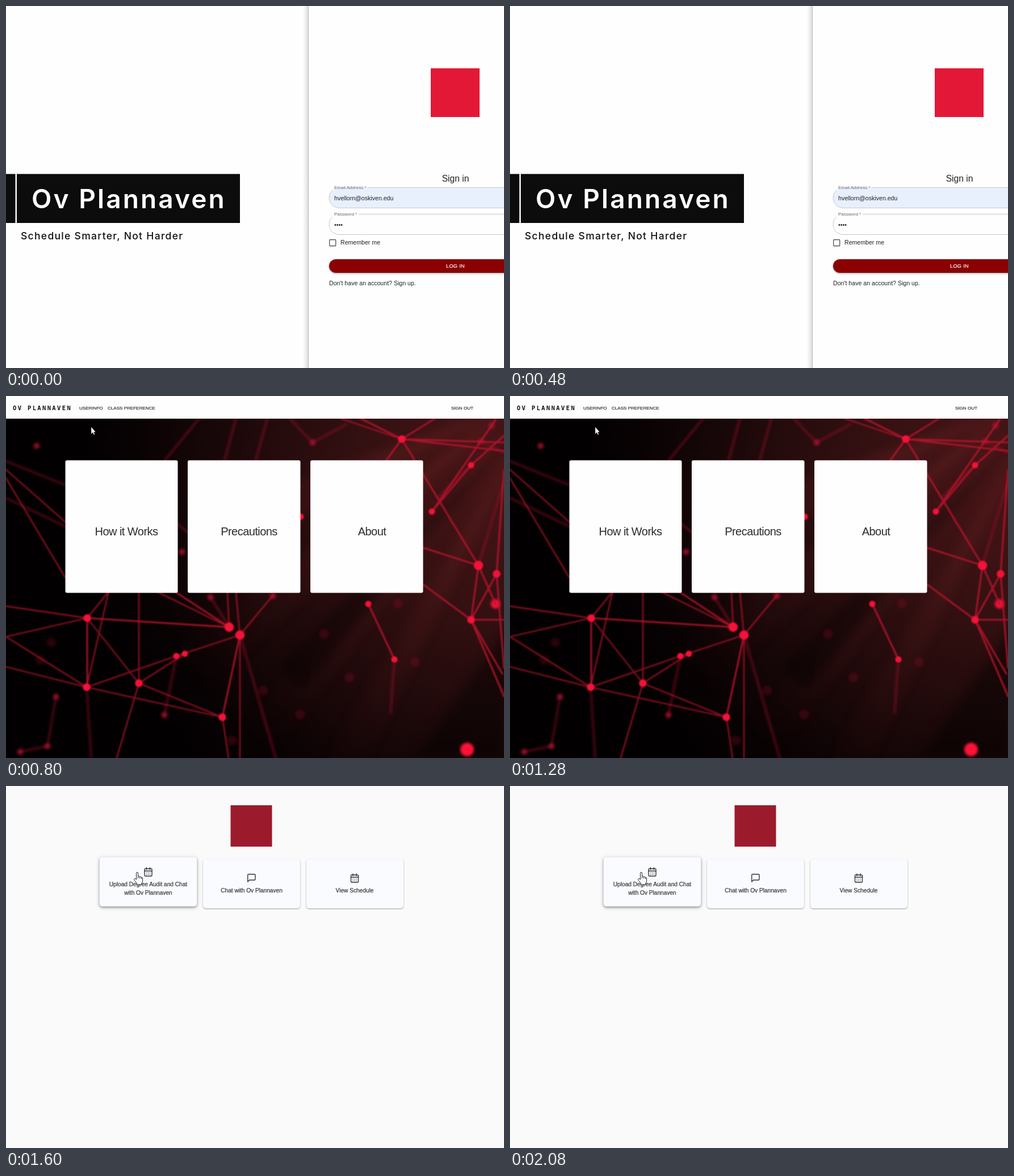
Recreate the animation shown at these times as an HTML page. Size 877 by 639 pixels, loop 2.4 s.

```html
<!DOCTYPE html>
<html lang="en">
<head>
<meta charset="utf-8">
<title>Class planner</title>
<style>
  html, body { margin: 0; width: 100%; height: 100%; overflow: hidden; background: #fefefe; }
  svg { position: absolute; left: 0; top: 0; width: 877px; height: 639px; }
  text { font-family: "Liberation Sans", Arial, sans-serif; fill: #222; }
  .mid { text-anchor: middle; }

  /* Three screens, cut hard every 800 ms */
  .scene { visibility: hidden; animation: show 2400ms step-end infinite; }
  .login { visibility: visible; animation: none; }
  .home { animation-delay: -1600ms; }
  .menu { animation-delay: -800ms; }
  @keyframes show {
    0% { visibility: visible; }
    33.3334%, 100% { visibility: hidden; }
  }

  .brand { font: 600 46px Inter, sans-serif; letter-spacing: 3.1px; fill: #fff; }
  .tag { font: 500 17.5px Inter, sans-serif; letter-spacing: 1.3px; fill: #111; }
  .form text { font-size: 10.6px; }
  .form .label { font-size: 8px; fill: #666; }
  .form .action { font-size: 9.2px; letter-spacing: .3px; fill: #fff; stroke: #fff; stroke-width: .2px; }
  .outline { fill: none; stroke: #c8c8c8; }
  .raised { filter: drop-shadow(0 1.5px 1.5px rgba(0, 0, 0, .4)); }

  .web { fill: none; stroke-linecap: round; }
  .soft { filter: blur(2.2px); }
  .crisp { filter: blur(1px); }
  .nav text { font-size: 8.05px; stroke: #222; stroke-width: .15px; }
  .nav .name { font: bold 10.5px "DejaVu Sans Mono", monospace; letter-spacing: 2.35px; stroke: none; fill: #111; }
  .tiles text { font-size: 20px; letter-spacing: -.55px; fill: #2b2b2b; }

  .menu text { font-size: 10.13px; fill: #333; stroke: #333; stroke-width: .2px; }
  .card { fill: #f9fbff; filter: drop-shadow(0 1px 1.2px rgba(0, 0, 0, .38)); }
  .lift { filter: drop-shadow(0 2px 2px rgba(0, 0, 0, .38)) drop-shadow(0 1px 4px rgba(0, 0, 0, .1)); }
  .icon { fill: none; stroke: #333; stroke-width: 1.4px; stroke-linejoin: round; stroke-linecap: round; }
</style>
</head>
<body>

<svg class="scene login" viewBox="0 0 877 639">
  <defs>
    <linearGradient id="edge">
      <stop offset="0" stop-color="#fefefe"/>
      <stop offset=".25" stop-color="#f5f5f5"/>
      <stop offset=".75" stop-color="#e6e6e6"/>
      <stop offset="1" stop-color="#bcbcbc"/>
    </linearGradient>
  </defs>
  <rect width="877" height="639" fill="#fefefe"/>
  <rect x="523" width="10" height="639" fill="url(#edge)"/>

  <path d="M0 296.5H16.5V383H0ZM19 296.5H412V383H19Z" fill="#0c0c0c"/>
  <text class="brand" x="45" y="357">Ov Plannaven</text>
  <text class="tag" x="26" y="412">Schedule Smarter, Not Harder</text>

  <rect x="748" y="110" width="86" height="86" fill="#e31837"/>
  <text class="mid" x="791.5" y="310" font-size="15.6">Sign in</text>

  <g class="form">
    <rect x="569" y="320.5" width="445" height="36" rx="18" fill="#e8f0fe"/>
    <path class="outline" d="M637 320.5H900V356.5H587A18 18 0 0 1 575 325"/>
    <text class="label" x="578" y="323">Email Address *</text>
    <text x="578" y="342.5">hvellorn@oskiven.edu</text>

    <path class="outline" d="M621 367.5H900V403.5H587A18 18 0 0 1 575 372"/>
    <text class="label" x="578" y="370">Password *</text>
    <text x="578" y="389.5">••••</text>

    <rect x="569.7" y="412.5" width="11" height="11" rx="1" fill="none" stroke="#555" stroke-width="1.3"/>
    <text x="589" y="421">Remember me</text>

    <rect class="raised" x="569" y="447" width="445" height="24" rx="12" fill="#8b0000"/>
    <text class="mid action" x="791.5" y="462">LOG IN</text>
    <text x="569" y="493">Don't have an account? Sign up.</text>
  </g>
</svg>

<svg class="scene home" viewBox="0 0 877 639">
  <defs>
    <radialGradient id="glow" gradientUnits="userSpaceOnUse" cx="870" cy="130" r="760">
      <stop offset="0" stop-color="#481517"/>
      <stop offset=".3" stop-color="#361112"/>
      <stop offset=".6" stop-color="#1e090a"/>
      <stop offset=".85" stop-color="#080203"/>
      <stop offset="1" stop-color="#020001"/>
    </radialGradient>
    <linearGradient id="ray" gradientUnits="userSpaceOnUse" x1="877" y1="40" x2="420" y2="600">
      <stop offset="0" stop-color="#8a3030" stop-opacity=".28"/>
      <stop offset="1" stop-color="#6a2020" stop-opacity="0"/>
    </linearGradient>
  </defs>
  <rect width="877" height="639" fill="#020001"/>
  <rect y="40" width="877" height="599" fill="url(#glow)"/>

  <g style="filter:blur(9px)">
    <path fill="url(#ray)" d="M900 10L250 470L330 540ZM900 40L380 620L470 640ZM900 90L560 639L640 639ZM880 20L400 190L420 270Z"/>
    <path fill="#000" opacity=".4" d="M900 60L480 480L520 520ZM890 400L720 639H877Z"/>
  </g>

  <g class="web soft" stroke="#b01030">
    <path stroke-width="3.4" opacity=".5" d="M0 115L104 157M0 180L104 230M340 40L280 113M405 40L385 113M460 40L440 113M500 40L540 82L600 50
      M88 531L73 618L25 628M279 563L300 459M142 514L150 639M684 465L677 560M412 422L475 639M360 355L393 408
      M300 225L322 242M836 80L877 100M819 122L760 180M877 150L832 299"/>
    <path stroke-width="11" opacity=".75" d="M54 88h0M540 82h0M279 563h0M88 531h0M73 618h0M25 628h0M310 275h0M836 80h0M855 52h0M360 355h0M470 353h0"/>
    <path stroke-width="17" opacity=".22" d="M560 420h0M453 520h0M518 562h0M605 497h0M398 608h0M690 366h0M80 435h0M60 466h0M720 470h0"/>
    <path stroke="#f01238" stroke-width="17" d="M862 367h0"/>
    <path stroke="#ff1238" stroke-width="24" d="M812 624h0"/>
  </g>

  <g class="web crisp" stroke="#c0142f">
    <path stroke-width="2.8" opacity=".65" d="M0 130L104 222M0 145L104 320M0 371L143 392L0 425L142 514L0 478M143 392L234 507M143 392L185 340M142 514L182 340
      M234 507L234 347M234 507L195 639M234 507L381 567L142 514L300 459L412 422M234 507L315 455M265 345L393 408L390 347M405 347L412 422
      L470 352M412 422V639M381 567L392 639M590 40L697 76"/>
    <path stroke-width="3.2" opacity=".8" d="M143 392V514M143 392L393 408L300 347M412 422L381 567M625 40L697 76L755 40M877 82L697 76L877 97M697 76L670 113M697 76L832 299
      M750 204L836 80L862 42M750 204L819 122L877 70M735 268L832 299L819 395L735 333M832 299L862 367M864 314L819 395H877M864 314L877 130
      M819 395L877 530M819 395L874 490M864 314L877 480M638 367L684 465"/>
  </g>
  <g class="web crisp" stroke="#f51238">
    <path stroke-width="11" d="M819 122h0M750 204h0M519 213h0M638 367h0M684 465h0M300 459h0M315 455h0"/>
    <path stroke-width="13.5" d="M697 76h0M864 314h0M819 395h0M143 392h0M234 507h0M142 514h0M381 567h0"/>
    <path stroke-width="16.5" d="M832 299h0M393 408h0M412 422h0"/>
  </g>

  <g class="nav">
    <rect width="877" height="40" fill="#fefefe"/>
    <text class="name" x="12" y="24.5">OV PLANNAVEN</text>
    <text x="129" y="24">USERINFO</text>
    <text x="179" y="24">CLASS PREFERENCE</text>
    <text x="784" y="24">SIGN OUT</text>
  </g>

  <g class="tiles">
    <g fill="#fefefe">
      <rect x="104.5" y="113.5" width="198" height="234" rx="3"/>
      <rect x="320" y="113.5" width="198.5" height="234" rx="3"/>
      <rect x="536" y="113.5" width="198.5" height="234" rx="3"/>
    </g>
    <text class="mid" x="212" y="246">How it Works</text>
    <text class="mid" x="428" y="246">Precautions</text>
    <text class="mid" x="644.5" y="246">About</text>
  </g>
  <path d="M150 54.5V67L152.7 64.5L154.6 68.6L156.4 67.8L154.6 63.8H158Z" fill="#fff" stroke="#222" stroke-width=".5"/>
</svg>

<svg class="scene menu" viewBox="0 0 877 639">
  <defs>
    <g id="calendar" class="icon">
      <rect x="-6.5" y="-5.5" width="13" height="13" rx="1.5"/>
      <path d="M-6.5 -1.5H6.5M-3 -7.5V-4M3 -7.5V-4"/>
      <path d="M-3 1.7h0M0 1.7h0M3 1.7h0M-3 4.7h0M0 4.7h0M3 4.7h0"/>
    </g>
  </defs>
  <rect width="877" height="639" fill="#fafafa"/>
  <rect x="395.5" y="34" width="73" height="73" fill="#9b1b2d"/>

  <rect class="card lift" x="164.7" y="125.5" width="171.5" height="87" rx="5"/>
  <rect class="card" x="347" y="129" width="171" height="87" rx="5"/>
  <rect class="card" x="529" y="129" width="171" height="87" rx="5"/>

  <use href="#calendar" x="250.5" y="151.5"/>
  <text class="mid" x="250.5" y="177">Upload Degree Audit and Chat</text>
  <text class="mid" x="250.5" y="192">with Ov Plannaven</text>

  <path class="icon" d="M427 155.7H437.5Q439 155.7 439 157.2V164.5Q439 166 437.5 166H428.7L425.7 169V157.2Q425.7 155.7 427 155.7Z"/>
  <text class="mid" x="432.5" y="188">Chat with Ov Plannaven</text>

  <use href="#calendar" x="614" y="162.5"/>
  <text class="mid" x="614" y="188">View Schedule</text>

  <path d="M229.5 165V154Q229.5 152.3 231 152.3T232.6 154V159.5Q235 158.3 235.6 160.3Q238 159.3 238.4 161.3Q240.6 160.8 240.6 163V167.5Q240.6 170 238.8 171.5V174H230.5V172L226 166.2Q225 164 226.8 163.4Q228 163.2 229.5 165ZM232.6 159.5V163M235.6 160.5V163.5M238.4 161.5V164"
    fill="#fff" stroke="#222" stroke-width="1" stroke-linejoin="round"/>
</svg>

</body>
</html>
```
